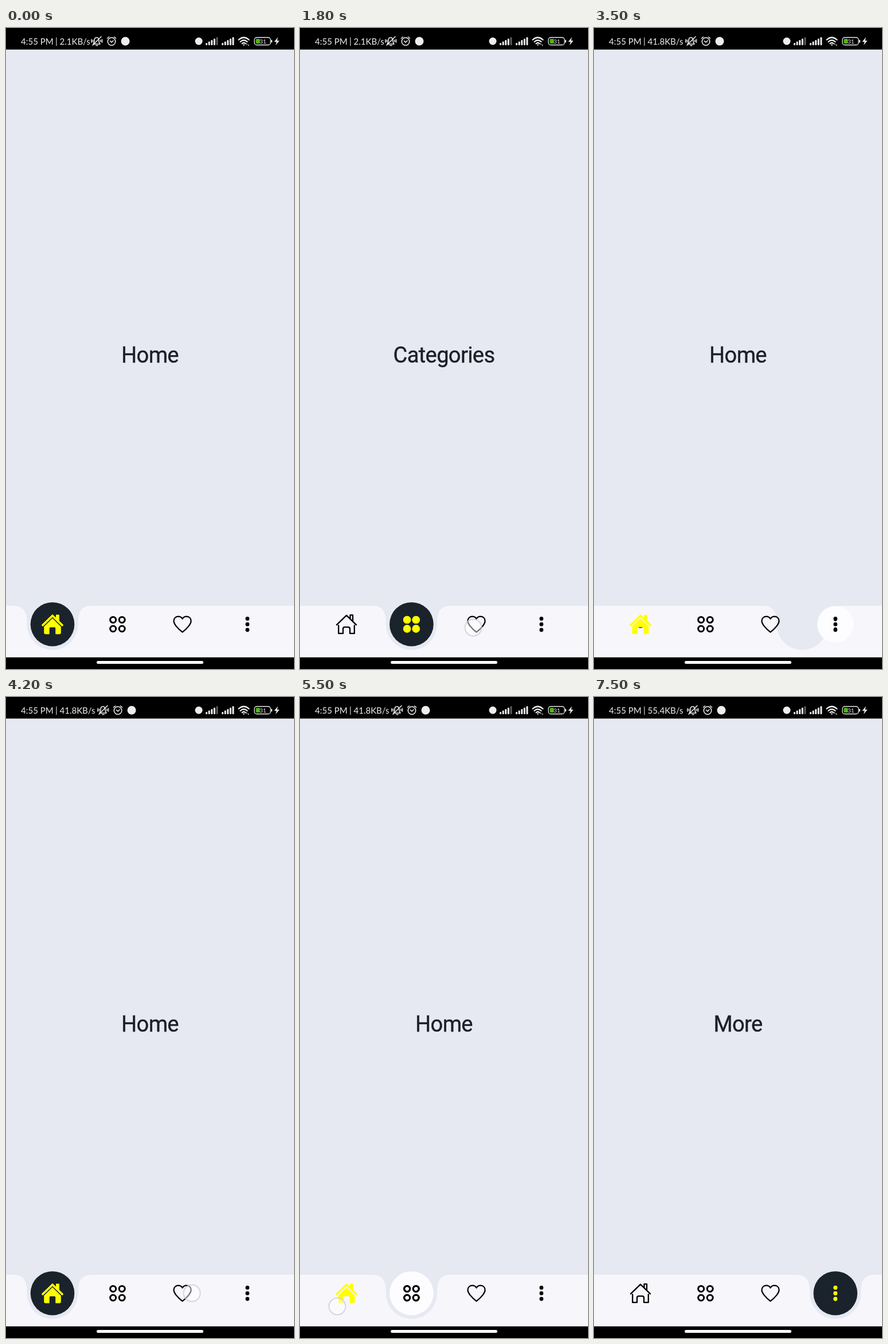
Animation, 502 px wide and 1115 px high, one loop 7.9 s. Source, as an HTML page:

```html
<!DOCTYPE html>
<html lang="en">
<head>
<meta charset="utf-8">
<title>Bottom navigation</title>
<style>
  html, body { margin: 0; width: 100%; height: 100%; overflow: hidden; background: #000; }
  svg { display: block; width: 502px; height: 1115px; }
  .status text { font: 15px Lato, sans-serif; fill: #eee; }
  .line { fill: none; stroke: #eee; stroke-width: 1.6; stroke-linecap: round; stroke-linejoin: round; }
  .icon { fill: none; stroke: #000; stroke-width: 2.3; stroke-linejoin: round; stroke-linecap: round; }
  .full { fill: #ff0; }
  #title { font: 38px Roboto, sans-serif; letter-spacing: -.6px; fill: #1c1f29; stroke: #1c1f29; stroke-width: .4; text-anchor: middle; }
</style>
</head>
<body>
<svg viewBox="0 0 502 1115">
  <defs>
    <path id="home" class="icon" d="M-13.8 2V16H-6V8Q-6 5-3 5H3Q6 5 6 8V16H13.800V2M-17 1L0-15.500L17 1M6.500-9.500V-16H11V-5.500"/>
    <g id="home-on" class="full">
      <path d="M0-10.300L14.500 4V15Q14.500 17 12.500 17H5.500V7Q5.500 5 3.500 5H-3.500Q-5.500 5-5.500 7V17H-12.500Q-14.500 17-14.500 15V4Z"/>
      <path d="M6-16.500H11.800V-5L6-10.500Z"/>
      <path d="M-17 1.500L0-15L17 1.500" fill="none" stroke="#ff0" stroke-width="3.300" stroke-linecap="round"/>
    </g>
    <path id="grid" class="icon" style="stroke-width:3"/>
    <path id="grid-on" class="full"/>
    <path id="heart" class="icon"/>
    <path id="heart-on" class="full"/>
    <path id="more"/>
    <path id="more-on" class="full"/>
  </defs>

  <rect width="502" height="1115"/>
  <rect y="37.500" width="502" height="1057" fill="#e6e9f1"/>

  <g class="status">
    <text x="26" y="29">4:55 PM</text>
    <text x="86" y="28">|</text>
    <text id="speed" x="93.500" y="29"></text>
    <g id="tray">
      <g class="line">
        <path d="M152 28H164Q162 26 162 23V21Q161 16.500 158 16.500Q154 16.500 154 22Q154 26 152 28ZM157 30.500H160M151 30L166 15M149 20V25M151.500 21V24M167.500 20V25M165 21V24"/>
        <circle cx="184" cy="23.500" r="6.700"/>
        <path d="M176.500 18L179.500 15.500M191.500 18L188.500 15.500M181.500 22.500L184 25L187 22"/>
      </g>
      <circle cx="208" cy="23" r="7.500" fill="#eee"/>
    </g>
    <circle cx="336" cy="23" r="6.500" fill="#eee"/>
    <g id="bars" fill="#eee"></g>
    <path class="line" style="stroke-width:2.200" d="M405.500 20.500Q414.500 12.500 423.500 20.500M408.500 24Q414.500 18.500 420.500 24M411.500 27Q414.500 24.500 417.500 27"/>
    <path fill="#eee" d="M412.500 28.500H416.500L414.500 31ZM418 28.500L419.500 26.500L421 28.500ZM421 29L422.500 31L424 29Z"/>
    <rect class="line" x="433" y="16.500" width="28" height="13" rx="4" style="stroke-width:1.300"/>
    <rect x="435.500" y="19" width="7" height="8" rx="1.500" fill="#55b614"/>
    <text x="442" y="27" style="font-size:10px">31</text>
    <rect x="462" y="20.500" width="2" height="5" rx="1" fill="#eee"/>
    <path fill="#eee" d="M474 16L467.500 24H471.500L470 30L476.500 22H472.500Z"/>
  </g>

  <text id="title" x="251" y="582"></text>
  <path id="bar" fill="#f7f6fb"/>
  <g id="items"></g>
  <circle id="touch" r="14.500" fill="#fff" fill-opacity=".45" stroke="#c9c9da" stroke-opacity=".75" stroke-width="2"/>
  <rect x="158" y="1101" width="186" height="5" rx="2.500" fill="#fff"/>
</svg>

<script>
const LOOP = 7900, STEP = 100, MOVE = 400, ROW = 1037.2;
const tabs = [
  { icon: 'home', label: 'Home', x: 81 },
  { icon: 'grid', label: 'Categories', x: 194.4 },
  { icon: 'heart', label: 'Favorites', x: 307.5 },
  { icon: 'more', label: 'More', x: 420.8 }
];
// [start time, tab]
const moves = [[-MOVE, 0], [950, 1], [1805, 2], [2570, 3], [3395, 0], [4300, 2], [4805, 1], [5495, 0], [6090, 3]];
// [start time, x, y]
const taps = [[700, 205, 1046], [1700, 302, 1043], [2500, 424, 1044], [3300, 84, 1045],
  [4200, 324, 1037], [4700, 200, 1043], [5400, 65, 1060], [6000, 420, 1044]];
// [start time, text, shift of the icons after it]
const speeds = [[0, '2.1KB/s', 0], [3000, '41.8KB/s', 11], [7000, '55.4KB/s', 14]];

const $ = id => document.getElementById(id);
const set = (el, attrs) => {
  for (const key in attrs) el.setAttribute(key, attrs[key]);
};
const make = (tag, parent, attrs = {}) => {
  const el = document.createElementNS('http://www.w3.org/2000/svg', tag);
  set(el, attrs);
  return parent.appendChild(el);
};

const disc = (x, y, r) => `M${x - r} ${y}a${r} ${r} 0 1 1 ${2 * r} 0a${r} ${r} 0 1 1 ${-2 * r} 0Z`;
const corners = r => [-7.8, 7.8].flatMap(x => [-7.8, 7.8].map(y => disc(x, y, r))).join('');
const dots = [-9.8, 0, 9.8].map(y => disc(0, y, 3.4)).join('');
const heart = 'M0 13.7C-8.5 7.5-15-1-15-5.5C-15-10.5-11.5-13.5-7-13.5C-4-13.5-1.5-12 0-9.5' +
  'C1.5-12 4-13.5 7-13.5C11.5-13.5 15-10.5 15-5.5C15-1 8.5 7.5 0 13.7Z';
const shapes = {
  grid: corners(5), 'grid-on': corners(6.7),
  heart, 'heart-on': heart,
  more: dots, 'more-on': dots
};
for (const id in shapes) set($(id), { d: shapes[id] });

[348, 376].forEach((left, n) => {
  for (let i = 0; i < 5; i++) {
    const h = 4 + i * 2.5;
    make('rect', $('bars'), { x: left + i * 4.6, y: 30 - h, width: 3, height: h, rx: 1.2, opacity: n || i < 4 ? 1 : .4 });
  }
});

for (const tab of tabs) {
  const g = make('g', $('items'), { transform: `translate(${tab.x} ${ROW})` });
  tab.layer = make('g', g);
  tab.disc = make('circle', tab.layer, { r: 38.3 });
  tab.inner = make('use', tab.layer);
  tab.outer = make('use', g);
}

const barPath = x => `M0 1094.5V1005H${x - 68}C${x - 52} 1005 ${x - 45} 1014 ${x - 44.5} 1033
  V${ROW}A44.5 44.5 0 0 0 ${x + 44.5} ${ROW}V1033C${x + 45} 1014 ${x + 52} 1005 ${x + 68} 1005H502V1094.5Z`;

const ease = p => p * p * (3 - 2 * p);
const lastIndex = (list, t) => list.findLastIndex(row => row[0] <= t);

function draw(t) {
  const m = lastIndex(moves, t);
  const now = moves[m][1], before = m ? moves[m - 1][1] : now;
  const p = ease(Math.min(1, (t - moves[m][0]) / MOVE));

  $('title').textContent = tabs[now].label;
  set($('bar'), { d: barPath(tabs[before].x + (tabs[now].x - tabs[before].x) * p) });

  tabs.forEach((tab, i) => {
    const on = i === now;
    const size = on ? p : i === before ? 1 - p : 0;
    const href = '#' + tab.icon + (on ? '-on' : '');
    set(tab.layer, { transform: `scale(${size})`, visibility: size > 0 ? 'visible' : 'hidden' });
    set(tab.disc, { fill: on ? '#1a232c' : '#fdfdff' });
    set(tab.inner, { href });
    set(tab.outer, { href });
  });

  const [, speed, shift] = speeds[lastIndex(speeds, t)];
  $('speed').textContent = speed;
  set($('tray'), { transform: `translate(${shift} 0)` });

  const [since, cx, cy] = taps[lastIndex(taps, t)] || [-LOOP, 0, 0];
  const opacity = Math.max(0, Math.min(1, (200 - t + since) / 100));
  set($('touch'), { cx, cy, opacity });
}

const start = performance.now();
function tick() {
  const t = (performance.now() - start) % LOOP;
  draw(Math.floor(t / STEP) * STEP);
  requestAnimationFrame(tick);
}
tick();
</script>
</body>
</html>
```
